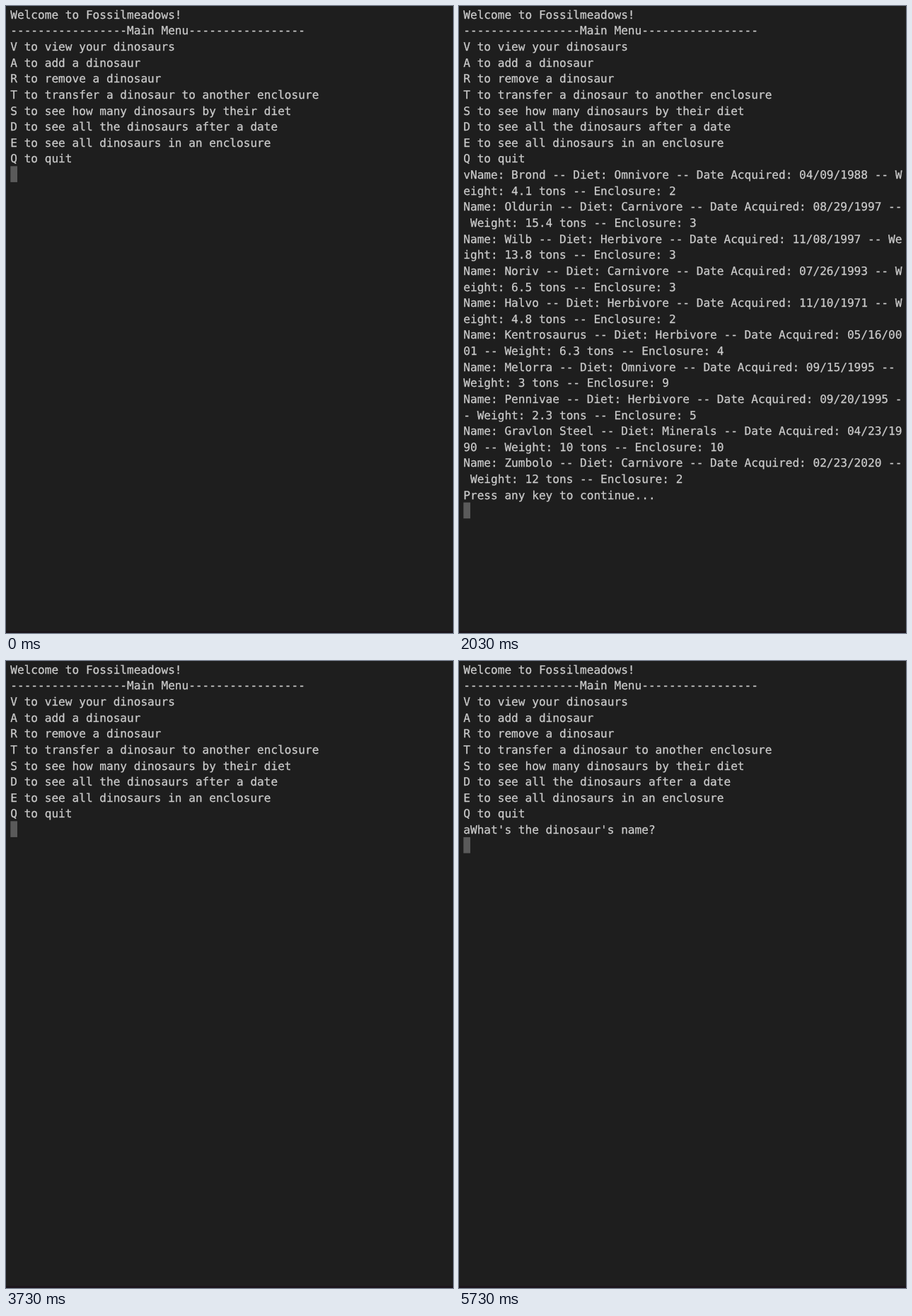
Animation of 632x886 px, one loop 8000 ms. Source, as an HTML page with a canvas:

```html
<!DOCTYPE html>
<html lang="en">
<head>
<meta charset="utf-8">
<title>Terminal menu</title>
<style>
  html, body { margin: 0; height: 100%; overflow: hidden; background: #1e1e1e; }
  canvas { display: block; }
</style>
</head>
<body>
<canvas id="screen" width="632" height="886"></canvas>
<script>
const ctx = document.getElementById('screen').getContext('2d');
const LOOP = 8000, COLUMNS = 64;
const LEFT = 6.3, CELL = 9.693, ROW = 22.63, BASELINE = 17.8;

const rule = '-'.repeat(17);
const menu = `Welcome to Fossilmeadows!
${rule}Main Menu${rule}
V to view your dinosaurs
A to add a dinosaur
R to remove a dinosaur
T to transfer a dinosaur to another enclosure
S to see how many dinosaurs by their diet
D to see all the dinosaurs after a date
E to see all dinosaurs in an enclosure
Q to quit
`;

const dinosaurs = [
  ['Brond', 'Omnivore', '04/09/1988', '4.1', 2],
  ['Oldurin', 'Carnivore', '08/29/1997', '15.4', 3],
  ['Wilb', 'Herbivore', '11/08/1997', '13.8', 3],
  ['Noriv', 'Carnivore', '07/26/1993', '6.5', 3],
  ['Halvo', 'Herbivore', '11/10/1971', '4.8', 2],
  ['Kentrosaurus', 'Herbivore', '05/16/0001', '6.3', 4],
  ['Melorra', 'Omnivore', '09/15/1995', '3', 9],
  ['Pennivae', 'Herbivore', '09/20/1995', '2.3', 5],
  ['Gravlon Steel', 'Minerals', '04/23/1990', '10', 10],
  ['Zumbolo', 'Carnivore', '02/23/2020', '12', 2],
];
const listing = dinosaurs.map(([name, diet, date, weight, enclosure]) =>
  `Name: ${name} -- Diet: ${diet} -- Date Acquired: ${date}` +
  ` -- Weight: ${weight} tons -- Enclosure: ${enclosure}\n`).join('');

// Each screen is shown from its start time until the next one.
const screens = [
  [0, menu],
  [1030, menu + 'v' + listing + 'Press any key to continue...\n'],
  [3570, ''],
  [3730, menu],
  [5700, menu + 'a'],
  [5730, menu + "aWhat's the dinosaur's name?\n"],
];

function wrap(line) {
  const rows = [];
  do {
    rows.push(line.slice(0, COLUMNS));
    line = line.slice(COLUMNS);
  } while (line);
  return rows;
}

function drawRow(row, i) {
  const y = i * ROW + BASELINE;
  ctx.fillText(row, LEFT, y);
  ctx.strokeText(row, LEFT, y);
}

function draw(text) {
  const rows = text.split('\n').flatMap(wrap);
  const last = rows.length - 1;

  ctx.fillStyle = '#1e1e1e';
  ctx.fillRect(0, 0, 632, 886);
  ctx.fillStyle = '#1b151b';
  ctx.fillRect(0, 883, 632, 3);

  ctx.fillStyle = '#5a5a5a';
  ctx.fillRect(LEFT + rows[last].length * CELL, last * ROW, CELL, ROW);

  ctx.font = '16.1px "DejaVu Sans Mono", monospace';
  ctx.textRendering = 'geometricPrecision';
  ctx.fillStyle = ctx.strokeStyle = '#cccccc';
  ctx.lineWidth = 0.25;
  ctx.save();
  ctx.rotate(1e-5); // keeps fractional baselines from snapping to whole pixels
  rows.forEach(drawRow);
  ctx.restore();
}

function frame() {
  const time = performance.now() % LOOP;
  draw(screens.findLast(([start]) => start <= time)[1]);
  requestAnimationFrame(frame);
}
frame();
</script>
</body>
</html>
```
